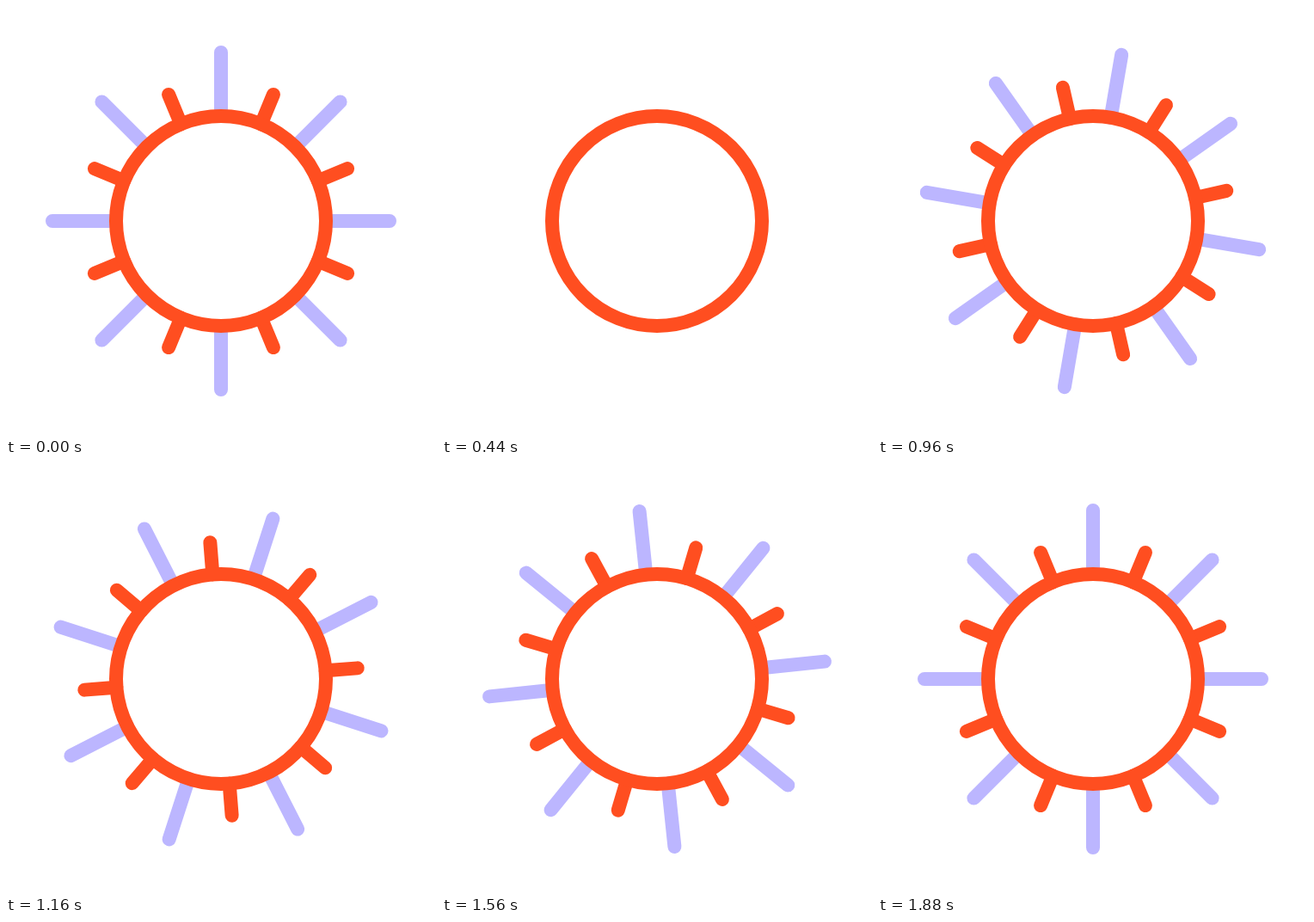
Write an HTML page with a canvas that moves like this. It is 500 px wide and 500 px high and loops after 2 s.

```html
<!DOCTYPE html>
<html lang="en">
<head>
<meta charset="utf-8">
<title>Sun</title>
<style>
html, body { margin: 0; width: 100%; height: 100%; overflow: hidden; background: #fff; }
canvas { display: block; width: 500px; height: 500px; }
</style>
</head>
<body>
<canvas id="stage" width="500" height="500"></canvas>
<script>
const ctx = document.getElementById('stage').getContext('2d');
const LOOP = 2000, STEP = 40;
const TURN = 725, REST = 1874, SWING = -38.55;
const GONE = 442, FULL = 763;
const RED = '#ff4e20', LILAC = '#bcb6ff';
const RING = 122;

// cubic-bezier(.42, 0, .58, 1), solved by bisection
function ease(x) {
  if (x <= 0) return 0;
  if (x >= 1) return 1;
  let lo = 0, hi = 1;
  for (let i = 0; i < 30; i++) {
    const m = (lo + hi) / 2;
    if (m * (1.26 - 0.78 * m + 0.52 * m * m) < x) lo = m; else hi = m;
  }
  return lo * lo * (3 - 2 * lo);
}

const progress = (t, from, to) => ease((t - from) / (to - from));

function rays(color, tip, offset, angle, start, end) {
  if (end - start < 0.002) return;
  const len = tip - RING;
  ctx.strokeStyle = color;
  ctx.beginPath();
  for (let i = 0; i < 8; i++) {
    const a = (angle + offset + i * 45) * Math.PI / 180;
    const x = Math.sin(a), y = -Math.cos(a);
    const r0 = RING + len * start, r1 = RING + len * end;
    ctx.moveTo(x * r0, y * r0);
    ctx.lineTo(x * r1, y * r1);
  }
  ctx.stroke();
}

function draw(t) {
  const angle = SWING * (t < TURN ? progress(t, 0, TURN) : 1 - progress(t, TURN, REST));
  // rays leave outward, then grow again from the ring
  const start = t < GONE ? progress(t, 0, GONE) : 0;
  const end = t < GONE ? 1 : progress(t, GONE, FULL);

  ctx.setTransform(1, 0, 0, 1, 0, 0);
  ctx.fillStyle = '#fff';
  ctx.fillRect(0, 0, 500, 500);
  ctx.translate(250, 250);
  ctx.lineWidth = 16;
  ctx.lineCap = 'round';

  rays(LILAC, 196, 0, angle, start, end);
  rays(RED, 159.2, 22.5, angle, start, end);
  ctx.strokeStyle = RED;
  ctx.beginPath();
  ctx.arc(0, 0, RING, 0, Math.PI * 2);
  ctx.stroke();
}

const begin = performance.now();
function tick() {
  const t = (performance.now() - begin) % LOOP;
  draw(Math.floor(t / STEP) * STEP);
  requestAnimationFrame(tick);
}
tick();
</script>
</body>
</html>
```
